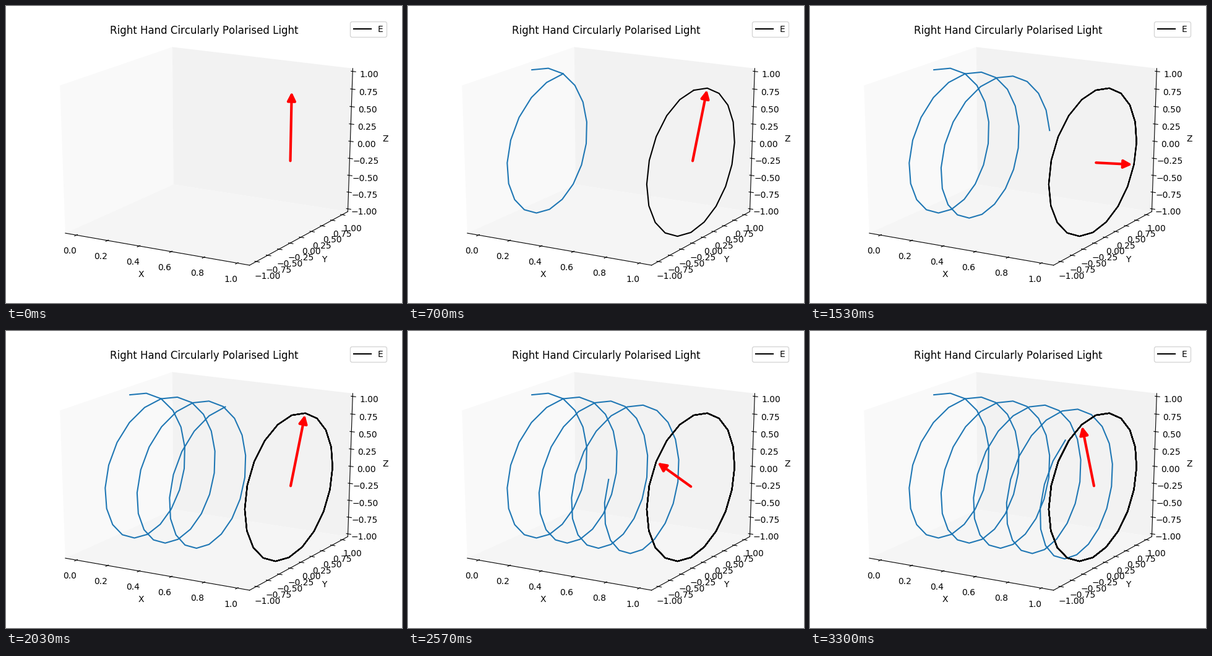
These frames come from a looping animation (640x480 px, 3.33 s). A matplotlib script:

```python
import numpy as np
import matplotlib.pyplot as plt
from matplotlib.animation import FuncAnimation
from matplotlib.patches import FancyArrowPatch, Polygon

plt.rcParams["font.family"] = "DejaVu Sans"
plt.rcParams["text.kerning_factor"] = 6

W, H, MARGIN = 640, 480, 18
ELEV, AZIM, DIST = np.radians(20), np.radians(-60), 10
EDGE = 0.5 * (1 + 1 / 24)      # half size of the drawn box
TICK_OUT, TICK_IN = 0.2 / 12, 0.1 / 12
PER_POINT = 48 / (0.72 * (W + H - 4 * MARGIN)) / 12
TICK_PAD, LABEL_PAD = 11.5 * PER_POINT, 25 * PER_POINT

STEPS = 100                    # trace points per loop
PER_TURN = 20
TICKS = 333                    # loop length in hundredths of a second

LEFT, RIGHT, FLOOR = "0.975", "0.95", "0.9625"


def project(p):
    """Perspective view of points in a unit cube centred on the origin."""
    p = np.asarray(p, float)
    se, ce, sa, ca = np.sin(ELEV), np.cos(ELEV), np.sin(AZIM), np.cos(AZIM)
    depth = DIST - p @ [ca * ce, sa * ce, se]
    x = p @ [-sa, ca, 0] / depth
    y = p @ [-se * ca, -se * sa, ce] / depth
    return np.stack([x, y], axis=-1)


def to_cube(x, y, z):
    x, y, z = np.broadcast_arrays(x, y, z)
    return np.stack([(x + 0.05) / 1.1 - 0.5, y / 2.2, z / 2], axis=-1)


fig = plt.figure(figsize=(W / 100, H / 100), dpi=100, facecolor="white")
ax = fig.add_axes([MARGIN / W, MARGIN / H, 1 - 2 * MARGIN / W, 1 - 2 * MARGIN / H])
ax.set_xlim(-0.095, 0.09)
ax.set_ylim(-0.095, 0.09)
ax.axis("off")
ax.set_title("Right Hand Circularly Polarised Light", y=0.92, pad=6)


def pane(axis, side, color):
    """Fill one face of the box."""
    square = np.array([(-1, -1), (1, -1), (1, 1), (-1, 1)])
    face = np.insert(square, axis, side, axis=1) * EDGE
    ax.add_patch(Polygon(project(face), facecolor=color, edgecolor="none", zorder=0))


def segment(a, b):
    ax.plot(*project([a, b]).T, color="black", lw=0.8, zorder=1)


def draw_axis(axis, sides, tick_dir, ticks, fmt, name):
    """Axis line, ticks and labels along the box edge given by sides."""
    sides = np.array(sides, float)
    along = np.eye(3)[axis]
    out = np.eye(3)[tick_dir] * sides
    segment(sides * EDGE - along * EDGE, sides * EDGE + along * EDGE)
    for value in ticks:
        at = along * to_cube(value, value, value)
        edge = at + sides * EDGE
        segment(edge - out * TICK_IN, edge + out * TICK_OUT)
        text = fmt.format(value).replace("-", "\u2212")
        ax.text(*project(at + sides * (EDGE + TICK_PAD)), text,
                ha="center", va="top", fontsize=10)
    ax.text(*project(sides * (EDGE + LABEL_PAD)), name,
            ha="center", va="center", fontsize=10)


pane(0, -1, LEFT)
pane(1, 1, RIGHT)
pane(2, -1, FLOOR)

quarters = np.linspace(-1, 1, 9)
draw_axis(0, (0, -1, -1), 1, np.linspace(0, 1, 6), "{:.1f}", "X")
draw_axis(1, (1, 0, -1), 0, quarters, "{:.2f}", "Y")
draw_axis(2, (1, 1, 0), 0, quarters, "{:.2f}", "Z")

step = np.arange(STEPS)
angle = 2 * np.pi * step / PER_TURN
helix = project(to_cube(step / STEPS, np.sin(angle), np.cos(angle)))
circle = project(to_cube(1, np.sin(angle), np.cos(angle)))
centre = project(to_cube(1, 0, 0))

wave, = ax.plot([], [], color="#1f77b4", lw=1.5, zorder=3)
trace, = ax.plot([], [], color="black", lw=1.5, zorder=4, label="E")
arrow = FancyArrowPatch(centre, circle[0], arrowstyle="-|>", mutation_scale=20,
                        lw=3, color="red", zorder=5)
ax.add_patch(arrow)
ax.legend(loc="upper right", facecolor="white", edgecolor="0.8", fontsize=10)


def update(i):
    k = int((i + 0.5) * 0.3)   # a new step every 100/3 ms
    wave.set_data(*helix[:k].T)
    trace.set_data(*circle[:k].T)
    arrow.set_positions(centre, circle[k])
    return wave, trace, arrow


anim = FuncAnimation(fig, update, frames=TICKS, interval=10, repeat=True,
                     repeat_delay=0, blit=False)
plt.show()
```
